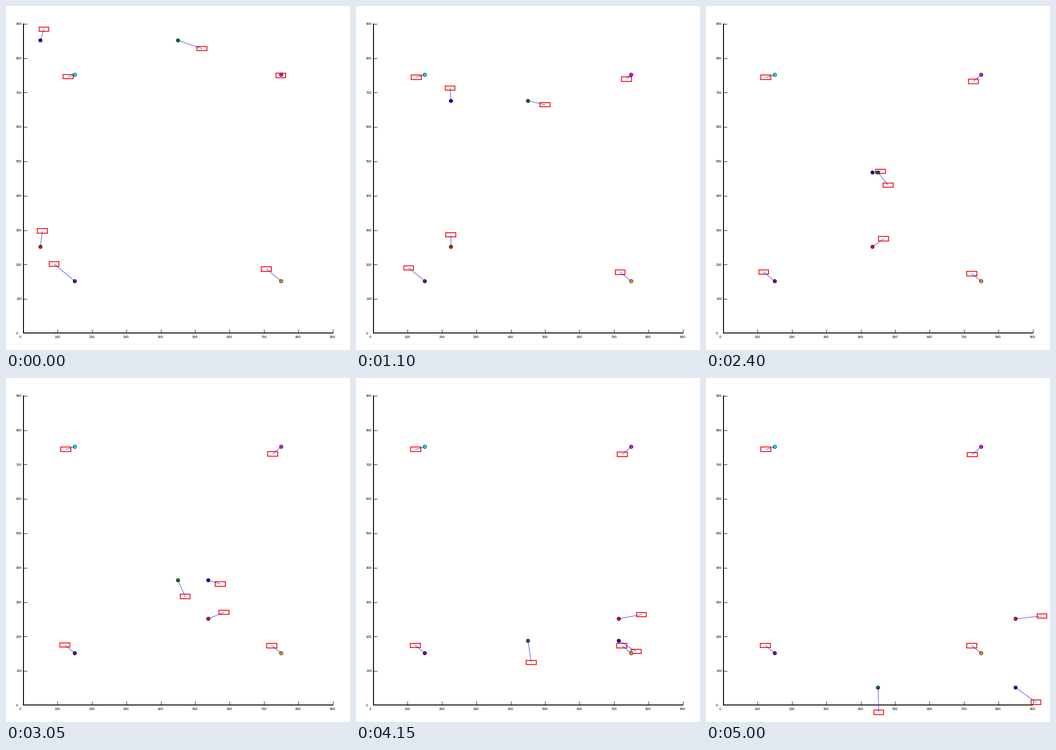
A matplotlib script that plays this animation: 748x748 px, repeating every 5.05 s.

```python
import numpy as np
import matplotlib.pyplot as plt
from matplotlib.animation import FuncAnimation
from matplotlib.patches import Circle, Rectangle

SIZE, DPI = 748, 88
FRAMES, STEP_MS = 101, 50
SCALE = 0.748            # pixels per chart unit
PX = 72 / DPI            # points per pixel
BOX = np.array([21.5, 9.5])
LAG = 5                  # frames a label trails behind its moving point


def to_px(x, y):
    """Chart units to stage pixels, with a margin of 50 units."""
    return np.array([(x + 50) * SCALE, (950 - y) * SCALE])


def drift(n):
    """Share of the way a label has swung round its moving point."""
    u = n / (FRAMES - 1)
    return u + 0.48 * u * (1 - u)


def settle(tau, power):
    """Share of the way for a label that comes to rest."""
    return lambda n: 1 - np.exp(-(n / tau) ** power)


class Marker:
    """A point with a label box tied to it; offsets are in pixels."""

    def __init__(self, color, start, step, offset, final, ease):
        self.start = to_px(*start)
        self.step = np.array([step[0], -step[1]]) * SCALE
        self.offset, self.final = np.array(offset), np.array(final)
        self.ease = ease
        self.box = Rectangle((0, 0), *BOX, fill=False, ec="red", lw=1.8 * PX,
                             joinstyle="miter", snap=True, zorder=2)
        self.dot = Circle((0, 0), 3.8, fc=color, ec="black", lw=0.85 * PX,
                          zorder=3)
        ax.add_patch(self.box)
        ax.add_patch(self.dot)
        self.link, = ax.plot([], [], color="blue", lw=0.8 * PX, zorder=4)

    def place(self, n):
        point = self.start + self.step * n
        trail = self.step * LAG
        swing = self.ease(n)
        offset = self.offset + (self.final - self.offset) * swing
        offset = offset - trail * (1 - np.exp(-n / LAG) - swing)
        label = point + offset
        self.dot.center = point
        self.box.set_xy(label - BOX / 2)
        self.link.set_data(*zip(point, label))
        return self.box, self.dot, self.link


def rule(xs, ys, width):
    ax.plot(xs, ys, color="black", lw=width * PX, zorder=1,
            solid_capstyle="butt")


def note(x, y, text):
    ax.text(x, y, text, family="Liberation Sans", size=10 * SCALE * PX,
            color="black", ha="left", va="baseline")


def draw_axes():
    left, bottom = 38, 711
    right, top = 711, 38
    rule([left, left], [top, bottom + 1], 2)
    rule([left - 1, right], [bottom, bottom], 2)
    for value in range(0, 901, 100):
        x, y = to_px(value, value)
        if value:
            tx = np.round(x) + 0.5
            ty = np.ceil(np.round(y, 6)) + 0.5
            rule([tx, tx], [bottom - 8, bottom], 1)
            rule([left, left + 8], [ty, ty], 1)
        note(x - (6.8 if value else 8.2), 722, str(value))
        note(22, y + 3.6, str(value))


fig = plt.figure(figsize=(SIZE / DPI, SIZE / DPI), dpi=DPI, facecolor="white")
ax = fig.add_axes([0, 0, 1, 1])
ax.set_xlim(0, SIZE)
ax.set_ylim(SIZE, 0)
ax.axis("off")
draw_axes()

STILL = (0, 0)
markers = [
    Marker("blue", (50, 850), (8, -8), (7.7, -24.3), (44.3, 31.8), drift),
    Marker("red", (50, 250), (8, 0), (4.2, -34.6), (57.3, -6.3), drift),
    Marker("green", (450, 850), (0, -8), (52, 17.6), (1.7, 53.6), drift),
    Marker("purple", (150, 150), STILL, (-45.1, -37.6), (-20.6, -16.9),
           settle(32, 1.7)),
    Marker("orange", (750, 150), STILL, (-32.4, -26.6), (-20.6, -16.6),
           settle(20, 2)),
    Marker("cyan", (150, 750), STILL, (-14.6, 4), (-19.6, 5.6),
           settle(17, 2)),
    Marker("magenta", (750, 750), STILL, (-1, 1.2), (-19.7, 16.9),
           settle(28.7, 1.22)),
]


def draw(n):
    return [artist for m in markers for artist in m.place(n)]


anim = FuncAnimation(fig, draw, frames=FRAMES, interval=STEP_MS,
                     repeat=True, repeat_delay=0, blit=False)
plt.show()
```
